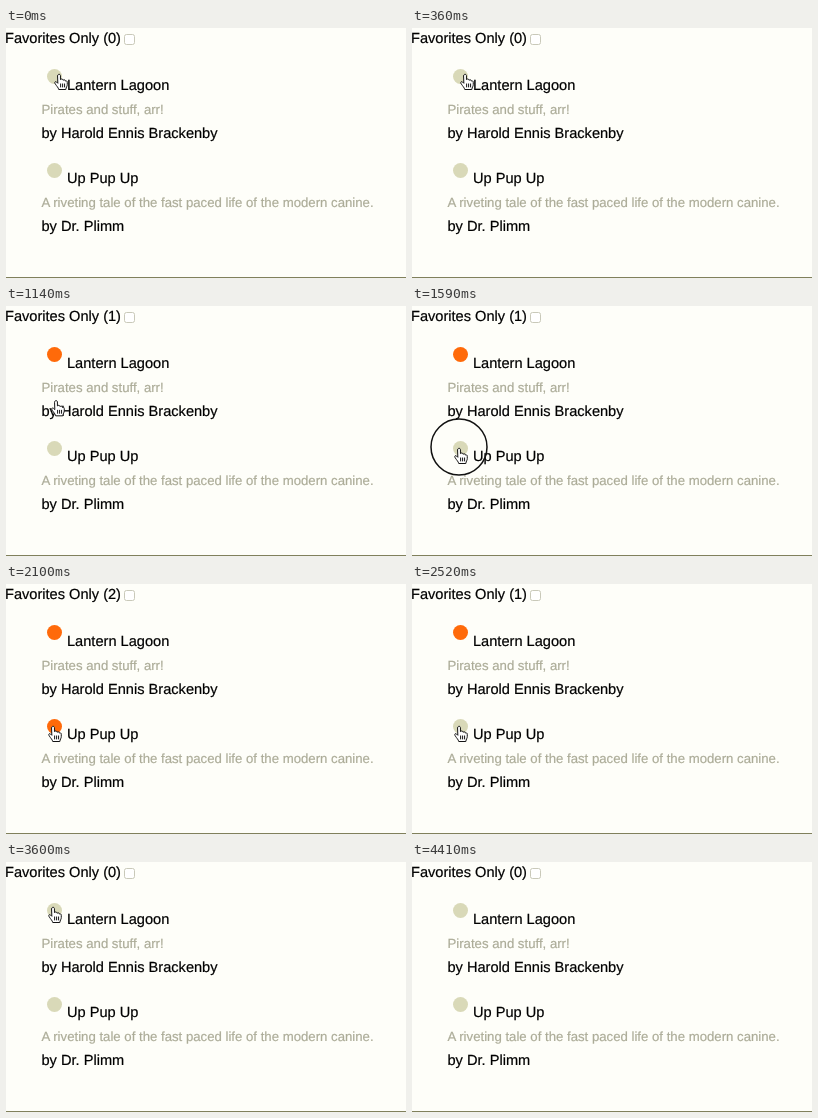
Write an HTML page that moves like this. It is 400 by 250 pixels and loops after 4440 ms.

```html
<!DOCTYPE html>
<html lang="en">
<head>
<meta charset="utf-8">
<title>Favorites</title>
<style>
  html, body { margin: 0; width: 100%; height: 100%; overflow: hidden; background: #fefef9; }
  svg { display: block; width: 100%; height: 100%; font: 14.6px "Liberation Sans", Arial, sans-serif; }
  text { fill: #000; stroke: #000; stroke-width: .2; text-rendering: geometricPrecision; }
  .blurb { font-size: 13.2px; fill: #acac98; stroke: #acac98; }
  .hand path { stroke: #111; stroke-width: 1.1; stroke-linejoin: round; stroke-linecap: round; }
</style>
</head>
<body>
<svg viewBox="0 0 400 250">
  <text id="count" x="-1" y="15"></text>
  <rect x="118.5" y="6.5" width="10" height="10" rx="2" fill="#fff" stroke="#c9c9b9"/>
  <g>
    <circle class="dot" cx="48.5" cy="48.5" r="7.5"/>
    <text x="61" y="62">Lantern Lagoon</text>
    <text x="35.5" y="86" class="blurb">Pirates and stuff, arr!</text>
    <text x="35.5" y="110">by Harold Ennis Brackenby</text>
  </g>
  <g transform="translate(0 93)">
    <circle class="dot" cx="48.5" cy="49.5" r="7.5"/>
    <text x="61" y="62">Up Pup Up</text>
    <text x="35.5" y="86" class="blurb">A riveting tale of the fast paced life of the modern canine.</text>
    <text x="35.5" y="110">by Dr. Plimm</text>
  </g>
  <rect y="249" width="400" height="1" fill="#80805c"/>
  <g id="pointer">
    <circle id="ring" r="28" fill="none" stroke="#111" stroke-width="1.5"/>
    <g class="hand" transform="translate(0 1.2) scale(.9)">
      <path fill="#fff" d="M-1.6 1.5C-1.6-.4 1.6-.4 1.6 1.5V6C2 5 4.4 5 4.6 6.8C5.2 5.8 7 6 7.1 7.6C8 7 9.2 7.6 9.2 9V11.5C9.2 13.5 7.8 14.5 7.6 17H-.3C-.6 15-2.8 13-4 11C-5.6 8.8-4 7.6-2.8 8.6L-1.6 9.8Z"/>
      <path fill="none" d="M1.8 10.8v3.4M4 10.8v3.4M6.2 10.8v3.4"/>
    </g>
  </g>
</svg>
<script>
  const LOOP = 4440, HIDE = 4350, PRESS = 120;

  // Pointer tip: time, x, y
  const path = [
    [0, 53, 45], [930, 53, 45], [1350, 47, 141],
    [2610, 47, 141], [3030, 47, 44], [LOOP, 47, 44]
  ];
  // Release time and the item it toggles
  const clicks = [[570, 0], [1620, 1], [2460, 1], [3300, 0]];

  const $ = id => document.getElementById(id);
  const dots = document.querySelectorAll('.dot');
  const ease = p => p * p * (3 - 2 * p);

  function tipAt(t) {
    const i = path.findIndex(step => step[0] > t);
    const [t0, x0, y0] = path[i - 1], [t1, x1, y1] = path[i];
    const p = ease((t - t0) / (t1 - t0));
    return [x0 + (x1 - x0) * p, y0 + (y1 - y0) * p];
  }

  function draw(t) {
    const on = [false, false];
    for (const [time, item] of clicks) if (t >= time) on[item] = !on[item];
    dots.forEach((dot, i) => dot.setAttribute('fill', on[i] ? '#ff6a0a' : '#d9d9b8'));
    $('count').textContent = `Favorites Only (${on.filter(Boolean).length})`;

    const pressed = clicks.some(([time]) => t >= time - PRESS && t < time);
    $('ring').style.display = pressed ? '' : 'none';
    $('pointer').style.display = t < HIDE ? '' : 'none';
    $('pointer').setAttribute('transform', `translate(${tipAt(t)})`);
  }

  const start = performance.now();
  function tick() {
    draw((performance.now() - start) % LOOP);
    requestAnimationFrame(tick);
  }
  tick();
</script>
</body>
</html>
```
